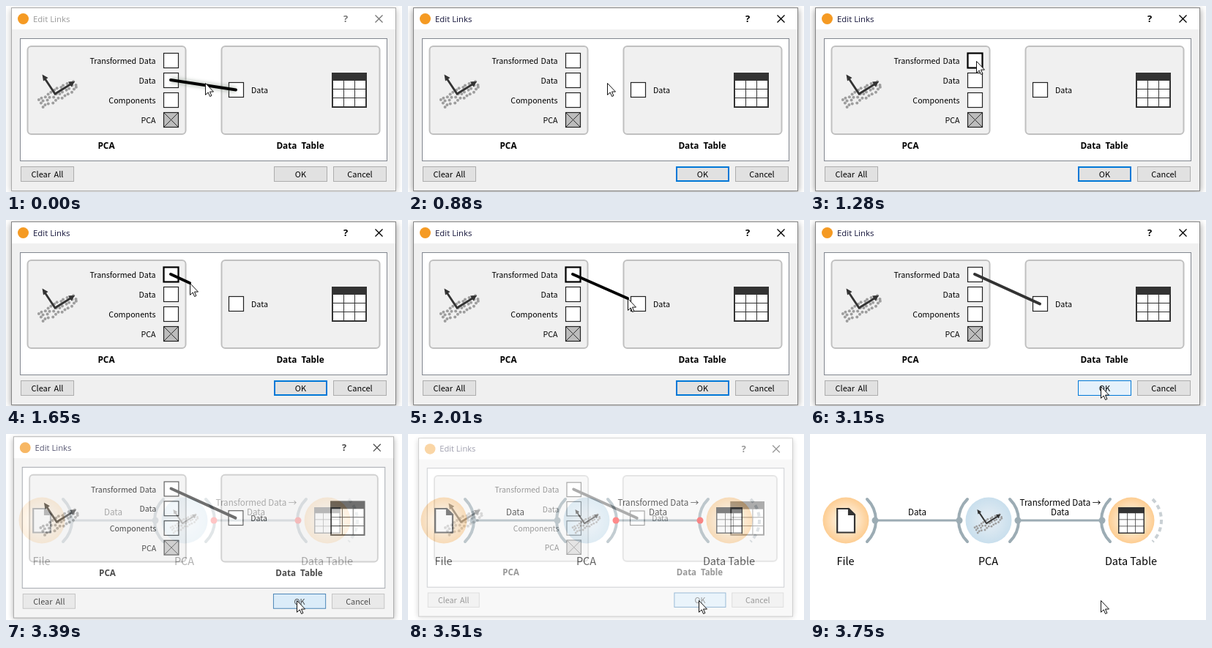
Animation of 541x254 px, one loop 4.77 s. Source, as an HTML page:

```html
<!DOCTYPE html>
<html lang="en">
<head>
<meta charset="utf-8">
<title>Edit Links</title>
<style>
html, body { margin: 0; width: 100%; height: 100%; overflow: hidden; background: #fff; }
svg { display: block; width: 541px; height: 254px; font-family: "Noto Sans CJK JP", "Noto Sans CJK", Roboto, sans-serif; }
.label { font-size: 10.7px; word-spacing: 1px; }
.button { font-size: 11px; text-anchor: middle; word-spacing: 2px; }
.name { font: bold 11.8px "Noto Sans", "Open Sans", sans-serif; text-anchor: middle; word-spacing: 3px; }
.link { font-size: 11.6px; text-anchor: middle; }
.node { font-size: 14.5px; text-anchor: middle; }
.title { font: 11.4px "Open Sans", "Noto Sans", sans-serif; }
.help { font: bold 13px "Open Sans", "Noto Sans", sans-serif; }
.end { text-anchor: end; }
</style>
</head>
<body>
<svg id="stage" viewBox="0 0 541 254">
  <defs>
    <radialGradient id="orange"><stop offset=".3" stop-color="#fef0dd"/><stop offset="1" stop-color="#fdcd92"/></radialGradient>
    <radialGradient id="blue"><stop offset=".3" stop-color="#dfeaf2"/><stop offset="1" stop-color="#c9dfed"/></radialGradient>
    <filter id="soft" x="-20%" y="-20%" width="140%" height="140%"><feGaussianBlur stdDeviation="4"/></filter>
    <filter id="halo" x="-20%" y="-100%" width="140%" height="300%"><feGaussianBlur stdDeviation="2"/></filter>
  </defs>
  <g id="canvas"></g>
  <g id="dialog"></g>
  <path id="cursor" d="M.5 .5V16.4L4.2 13 6.6 18.5 8.9 17.5 6.5 12.1H11.5Z" fill="#fff" stroke="#111"/>
</svg>
<script>
const $ = id => document.getElementById(id);
const canvas = $('canvas'), dialog = $('dialog');

function add(parent, tag, attrs, content) {
  const el = document.createElementNS('http://www.w3.org/2000/svg', tag);
  set(el, attrs);
  if (content) el.textContent = content;
  return parent.appendChild(el);
}
function set(el, attrs) {
  for (const key in attrs) el.setAttribute(key, attrs[key]);
}
const text = (parent, cls, x, y, s) => add(parent, 'text', { class: cls, x, y }, s);
const rect = (parent, x, y, width, height, attrs) =>
  add(parent, 'rect', { x, y, width, height, ...attrs });
const path = (parent, d, stroke, width = 1, attrs = {}) =>
  add(parent, 'path', { d, stroke, 'stroke-width': width, fill: 'none', ...attrs });
const group = (parent, x, y, scale = 1) =>
  add(parent, 'g', { transform: `translate(${x} ${y}) scale(${scale})` });

// Icons
function pcaIcon(parent, x, y, scale) {
  const g = group(parent, x, y, scale);
  let seed = 11;
  const rand = () => (seed = seed * 16807 % 2147483647) / 2147483647 - .5;
  for (let i = 0; i < 36; i++) {
    const u = (i % 12) / 11 * 2 - 1;
    const v = (Math.floor(i / 12) - 1) * 5.8 * (1 - .35 * u * u) + rand() * 2.5;
    add(g, 'circle', { cx: 4 + 23.5 * u + v * .5 + rand() * 2, cy: -13 * u + v, r: 2, fill: '#9d9d9d' });
  }
  path(g, 'M-14 -21L0 0L21 -13', '#333', 2.8);
  path(g, 'M-17.5 -26.5L-9.5 -22L-16 -17.5ZM27 -17L18 -16.5L22.5 -9.5Z', 'none', 0, { fill: '#333' });
}
function tableIcon(parent, x, y, scale) {
  const g = group(parent, x, y, scale);
  rect(g, 0, 0, 48, 48, { fill: '#333' });
  for (let row = 0; row < 3; row++)
    for (let col = 0; col < 3; col++)
      rect(g, 2 + col * 15, 11 + row * 12, 14, 11, { fill: '#fff' });
}
function fileIcon(parent) {
  path(parent, 'M37.2 102H53L61 110V134.5H37.2Z', '#333', 2.2, { fill: '#fff' });
  path(parent, 'M52.5 102V110.5H61Z', '#333', 1.2, { fill: '#333' });
}

// Workflow behind the dialog
const gray = '#9cacb4';
const arc = (cx, side, color, dash) =>
  path(canvas, `M${cx + side * 29} 89A41 41 0 0 ${side > 0 ? 1 : 0} ${cx + side * 29} 147`, color, 4,
    dash ? { 'stroke-dasharray': dash } : { 'stroke-linecap': 'round' });
const dot = cx => add(canvas, 'circle', { cx, cy: 118, r: 4.5, fill: gray });

rect(canvas, 0, 0, 541, 254, { fill: '#fff' });
path(canvas, 'M89 118H204M284 118H399', gray, 3);
for (const [cx, fill, label] of [[49, 'orange', 'File'], [244, 'blue', 'PCA'], [439, 'orange', 'Data Table']]) {
  add(canvas, 'circle', { cx, cy: 118, r: 31.5, fill: `url(#${fill})` });
  text(canvas, 'node', cx - .5, 179, label);
}
arc(49, 1, gray);
arc(244, -1, gray);
arc(244, 1, gray);
arc(439, -1, gray);
arc(439, 1, '#c9d0d4', '6 4.4');
dot(89);
dot(204);
const hotDots = [dot(284), dot(399)];
fileIcon(canvas);
pcaIcon(canvas, 241, 122, .72);
tableIcon(canvas, 421, 100, .75);
text(canvas, 'link', 146.5, 111, 'Data');
text(canvas, 'link', 342, 98, 'Transformed Data →');
text(canvas, 'link', 341.5, 111, 'Data');

// Dialog window
const shadow = rect(dialog, 6, 4, 528, 250, { rx: 3, filter: 'url(#soft)' });
const frame = rect(dialog, 7.5, 2.5, 525, 250, { fill: '#f0f0f0' });
rect(dialog, 8, 3, 524, 29, { fill: '#fff' });
add(dialog, 'circle', { cx: 23.5, cy: 17.5, r: 7.5, fill: '#f59a23' });
const title = text(dialog, 'title', 37, 21.5, 'Edit Links');
const help = text(dialog, 'help', 461, 22, '?');
const close = path(dialog, 'M504.5 12.5L514.5 22.5M514.5 12.5L504.5 22.5', '#000', 1.3);

rect(dialog, 19.5, 44.5, 501, 167, { fill: '#fff', stroke: '#828790' });
for (const x of [29.5, 294.5])
  rect(dialog, x, 55, 216, 120, { rx: 5, fill: '#f0f0f0', stroke: '#c0c0c0', 'stroke-width': 2 });
pcaIcon(dialog, 67, 120, 1);
tableIcon(dialog, 445, 91, 1);

const box = (x, y, fill = '#fff') =>
  rect(dialog, x + .5, y + .5, 20, 20, { fill, stroke: '#222', 'stroke-width': 1.2 });
const boxes = ['Transformed Data', 'Data', 'Components', 'PCA'].map((label, i) => {
  text(dialog, 'label end', 204.5, 79 + 27 * i, label);
  return box(215, 64 + 27 * i, i === 3 ? '#bcbcbc' : '#fff');
});
path(dialog, 'M215.5 145.5L235.5 165.5M235.5 145.5L215.5 165.5', '#333');
box(304, 104);
text(dialog, 'label', 335, 119, 'Data');
text(dialog, 'name', 137, 195, 'PCA');
text(dialog, 'name', 402, 195, 'Data Table');

// The border is drawn inside the 73 by 21 outline, whatever its width.
function border(face, x, stroke, width) {
  set(face, {
    x: x + width / 2, y: 219 + width / 2, width: 73 - width, height: 21 - width,
    stroke, 'stroke-width': width
  });
}
function button(x, label) {
  const face = add(dialog, 'rect', { fill: '#e1e1e1' });
  border(face, x, '#adadad', 1);
  text(dialog, 'button', x + 36.5, 234, label);
  return face;
}
button(20, 'Clear All');
const ok = button(366, 'OK');
button(447, 'Cancel');

const glow = path(dialog, 'M225 101L314 114.5', '#7f8f7f', 9, { opacity: .35, filter: 'url(#halo)' });
const wire = path(dialog, '', '#000', 4, { 'stroke-linecap': 'round' });

// start, cursor x, cursor y, mode, dialog opacity, dialog scale
const loop = 4770;
const steps = [
  [0, 272, 105, 'old'],
  [880, 272, 105, 'empty'],
  [1030, 261, 97, 'empty'],
  [1150, 240, 84, 'empty'],
  [1280, 227, 75, 'aim'],
  [1650, 251, 86, 'drag'],
  [1770, 268, 93, 'drag'],
  [1890, 285, 100, 'drag'],
  [2010, 300, 107, 'drag'],
  [2130, 310, 111, 'drag'],
  [2380, 320, 123, 'new'],
  [2500, 335, 140, 'new'],
  [2640, 357, 169, 'new'],
  [2770, 381, 201, 'new'],
  [2910, 390, 215, 'new'],
  [3030, 396, 223, 'hover'],
  [3150, 397, 227, 'hover'],
  [3390, 397, 227, 'press', .7, .989],
  [3510, 397, 227, 'press', .4, .973],
  [3630, 397, 227, 'press', .15, .952],
  [3750, 397, 227, 'done', 0]
];

// OK button: fill, border colour, border width
const plain = ['#e1e1e1', '#0078d7', 2];
const faces = {
  old: ['#e1e1e1', '#adadad', 1],
  hover: ['#e5f1fb', '#0078d7', 1],
  press: ['#cce4f7', '#005499', 1]
};
const linked = ['new', 'hover', 'press'];

function wirePath(mode, x, y) {
  if (mode === 'old') return 'M225 101L314 114.5';
  if (mode === 'drag') return `M225 74L${x} ${y}`;
  return linked.includes(mode) ? 'M225 74L314 114.5' : '';
}

function draw(time) {
  const [, x, y, mode, opacity = 1, scale = 1] = steps.findLast(step => step[0] <= time);
  const active = mode !== 'old', aimed = mode === 'aim' || mode === 'drag';

  set($('cursor'), { transform: `translate(${x} ${y})` });
  set(dialog, { opacity, transform: `translate(270 126) scale(${scale}) translate(-270 -126)` });
  set(shadow, { opacity: active ? .35 : .22 });
  set(frame, { stroke: active ? '#858585' : '#aaa' });
  set(title, { fill: active ? '#14143a' : '#999' });
  set(help, { fill: active ? '#000' : '#777' });
  set(close, { stroke: active ? '#000' : '#777' });

  set(boxes[0], { stroke: aimed ? '#000' : '#222', 'stroke-width': aimed ? 2.2 : 1.2 });
  set(glow, { visibility: active ? 'hidden' : 'visible' });
  set(wire, { d: wirePath(mode, x, y), stroke: linked.includes(mode) ? '#333' : '#000' });

  const [fill, stroke, width] = faces[mode] || plain;
  set(ok, { fill });
  border(ok, 366, stroke, width);
  for (const d of hotDots) set(d, { fill: mode === 'done' ? gray : '#ff3c3c' });
}

const begin = performance.now();
function tick() {
  draw((performance.now() - begin) % loop);
  requestAnimationFrame(tick);
}
tick();
</script>
</body>
</html>
```
